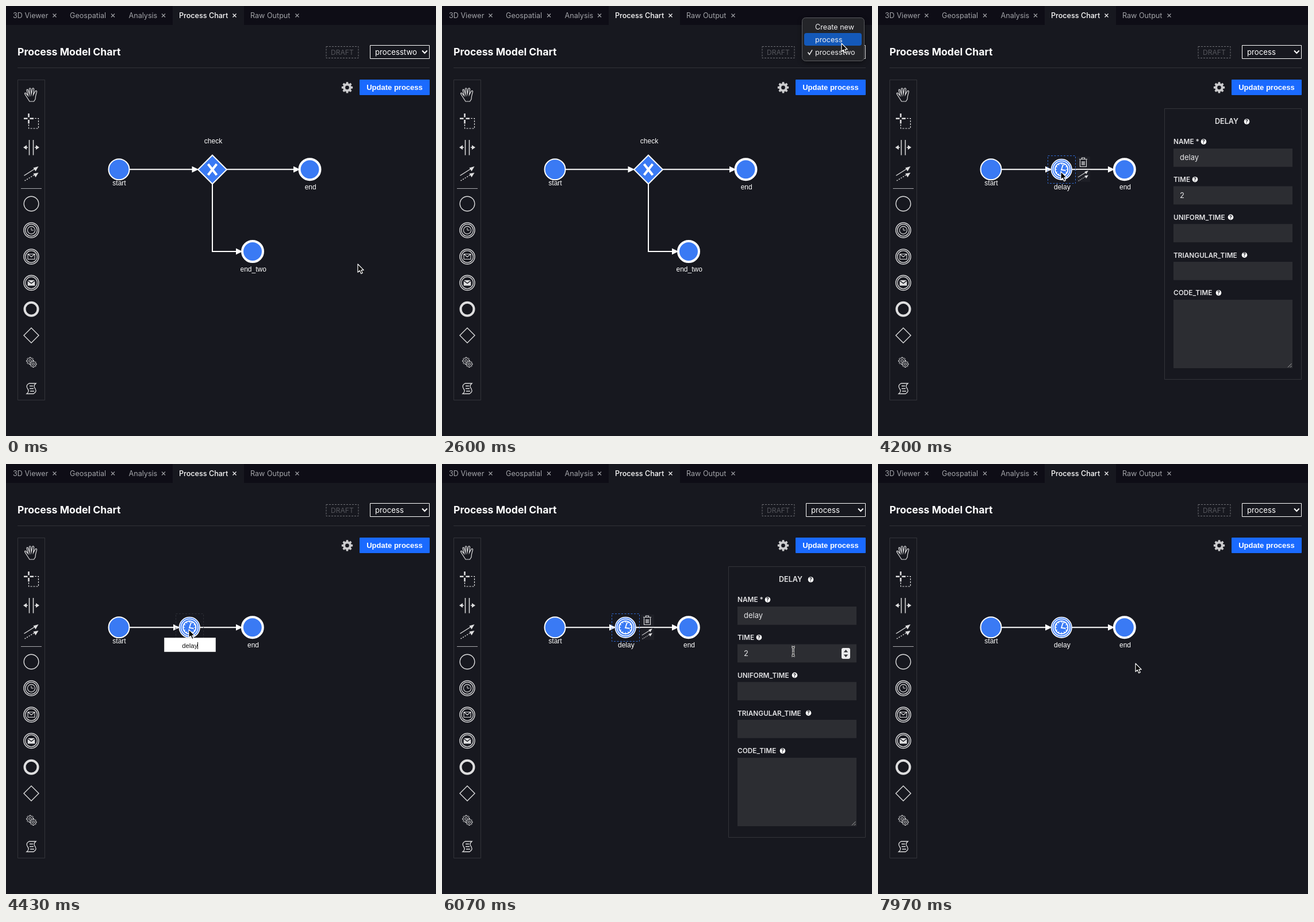
An HTML page with a canvas that plays this animation: 748x748 px, repeating every 8000 ms.

```html
<!DOCTYPE html>
<html lang="en">
<head>
<meta charset="utf-8">
<title>Process Model Chart</title>
<style>
html, body { margin: 0; width: 100%; height: 100%; overflow: hidden; background: #17181f; }
canvas { display: block; width: 748px; height: 748px; }
</style>
</head>
<body>
<canvas id="stage" width="748" height="748"></canvas>
<script>
const ctx = document.getElementById('stage').getContext('2d');
const LOOP = 8000;
const BG = '#17181f', BLUE = '#3a7af4', WHITE = '#fff', ICON = '#dededf', EDGE = '#33343a', FIELD = '#2c2d32';
const UI = 'Inter, sans-serif', ARIAL = '"Liberation Sans", Arial, sans-serif';

// Moments (ms) at which the interface changes
const AT = {
  menuOpen: 1450, menuHover: 1570, menuPick: 2660, menuFade: 2740, menuGone: 2900, switched: 2870,
  firstClick: 4130, editStart: 4300, editEnd: 4800, select: 5000, focus: 6170, deselect: 7830
};

// Pointer path: time, x, y
const PATH = [
  [0, 612, 449], [30, 612, 449], [830, 689, 100], [1100, 693, 80], [1270, 693, 79], [1500, 693, 79],
  [2230, 695, 65], [3230, 695, 65], [3430, 486, 243], [3720, 338, 283], [4060, 318, 288],
  [5540, 318, 288], [6040, 611, 326], [6870, 611, 326], [7200, 607, 322], [7420, 607, 322],
  [7800, 448, 347], [8000, 448, 347]
];

const between = (t, a, b) => t >= a && t < b;

function pointerAt(t) {
  const i = Math.max(1, PATH.findIndex(p => p[0] > t));
  const [t0, x0, y0] = PATH[i - 1], [t1, x1, y1] = PATH[i];
  let k = (t - t0) / (t1 - t0);
  k = k * k * (3 - 2 * k);
  return { x: x0 + (x1 - x0) * k, y: y0 + (y1 - y0) * k };
}

function text(str, x, y, size, color, { family = UI, weight = 400, align = 'left' } = {}) {
  ctx.font = `${weight} ${size}px ${family}`;
  ctx.textAlign = align;
  ctx.fillStyle = color;
  ctx.fillText(str, x, y);
}

function rect(x, y, w, h, fill, stroke, radius = 0) {
  ctx.beginPath();
  ctx.roundRect(x, y, w, h, radius);
  paint(fill, stroke, 1);
}

function circle(x, y, r, fill, stroke, width) {
  ctx.beginPath();
  ctx.arc(x, y, r, 0, Math.PI * 2);
  paint(fill, stroke, width);
}

function paint(fill, stroke, width) {
  if (fill) { ctx.fillStyle = fill; ctx.fill(); }
  if (stroke) { ctx.strokeStyle = stroke; ctx.lineWidth = width; ctx.stroke(); }
}

function shape(d, fill, stroke, width = 1.2) {
  const p = new Path2D(d);
  if (fill) { ctx.fillStyle = fill; ctx.fill(p); }
  if (stroke) { ctx.strokeStyle = stroke; ctx.lineWidth = width; ctx.stroke(p); }
}

function dashed(dash, draw) {
  ctx.setLineDash(dash);
  draw();
  ctx.setLineDash([]);
}

function gear(x, y, outer, inner, teeth, fill, stroke, width) {
  ctx.beginPath();
  const step = Math.PI * 2 / teeth;
  for (let i = 0; i < teeth; i++) {
    [[-.36, inner], [-.22, outer], [.22, outer], [.36, inner]].forEach(([off, r]) => {
      const a = (i + off) * step - Math.PI / 2;
      ctx.lineTo(x + Math.cos(a) * r, y + Math.sin(a) * r);
    });
  }
  ctx.closePath();
  paint(fill, stroke, width);
}

function drawHeader(process) {
  rect(0, 0, 748, 33, '#0e0d16');
  rect(290, 0, 124, 33, BG);
  const tabs = [['3D Viewer', 12, 84.5], ['Geospatial', 111, 186], ['Analysis', 213.5, 274],
    ['Process Chart', 301, 397.5], ['Raw Output', 425, 506.5]];
  tabs.forEach(([name, x, cx], i) => {
    const color = i === 3 ? WHITE : '#a3a4a9';
    text(name, x, 21, 12.6, color, { weight: i === 3 ? 500 : 400 });
    shape(`M${cx - 3} 13.5l6 6m0-6l-6 6`, null, color, 1.1);
  });
  text('Process Model Chart', 20, 85.5, 17.6, WHITE, { weight: 700 });
  rect(20, 107, 717, 1, '#313238');
  dashed([3, 2], () => rect(557, 70.5, 56, 20, null, '#707176'));
  text('DRAFT', 565, 85, 12.1, '#54555b');
  rect(633.5, 68.5, 103, 23, BG, WHITE);
  text(process, 642, 85, 13.2, WHITE);
  shape('M724 77.5l4.3 4.5l4.3-4.5', null, WHITE, 2);
  gear(593.5, 141.8, 9.8, 7.3, 8, '#cbcbcd');
  circle(593.5, 141.8, 3.4, BG);
  rect(615, 128, 122, 27, '#1a6aff', null, 1);
  text('Update process', 676, 146, 13, WHITE, { family: ARIAL, weight: 700, align: 'center' });
}

function connectIcon(x, y, s) {
  ctx.save();
  ctx.translate(x, y);
  ctx.scale(s, s);
  shape('M-12 4L7-8', null, ICON, 1.4);
  shape('M13-12L4-9.5L8-3.5Z M13-1L4 .5L8 7Z', ICON);
  dashed([2.2, 2], () => shape('M-11 13L7 2', null, ICON, 1.4));
  ctx.restore();
}

function drawPalette() {
  rect(20.5, 128.5, 47, 557, null, EDGE);
  shape('M36.5 159L32.5 152.5Q32.5 150.5 34.5 151.5L38.5 156L36 146.5Q36.5 144 38.3 146L41 154L40.5 144Q41.5 141.5 43.2 144L44 153.5L46 143.5Q48 142 48.6 144.5L47.5 154.5L51 148Q53.5 146.5 53.6 149L51.5 157L51 162L48.5 166H41Z', null, ICON);
  shape('M39.5 187v6.5M39.5 198v6.5M31 195.7h6.5M41.5 195.7h6.5', null, ICON, 2.6);
  dashed([3, 2], () => shape('M50 195.5h6.5v17.5h-17v-7', null, ICON, 1.2));
  shape('M40.5 233v26.5M47.5 233v26.5M32 246h6M50 246h6', null, ICON, 1.5);
  shape('M30 246l6-4v8zM58 246l-6-4v8z', ICON);
  connectIcon(43.5, 291, 1);
  rect(26, 317, 36, 1, '#a9a9ad');
  circle(44, 344, 12.8, null, ICON, 1.4);
  [390, 436, 481.5].forEach(y => {
    circle(44, y, 13, null, ICON, 1.4);
    circle(44, y, 10.3, null, ICON, 1.2);
  });
  circle(44, 390, 6.6, null, ICON, 1.1);
  shape('M44 386v4h4', null, ICON, 1);
  shape('M38 431.5h12v9h-12zl6 5l6-5', null, ICON, 1.1);
  shape('M38 477h12l-6 4.6zM37.7 478.5l6.3 4.8l6.3-4.8v8h-12.6z', ICON);
  circle(44, 527.3, 11.5, null, ICON, 4);
  shape('M44 560l13 13l-13 13l-13-13z', null, ICON, 1.4);
  gear(42, 617.5, 6.4, 4.6, 8, null, ICON, 1);
  circle(42, 617.5, 2.2, null, ICON, 1);
  gear(47.5, 623, 5.6, 4, 8, BG, ICON, 1);
  circle(47.5, 623, 1.9, null, ICON, 1);
  shape('M40 656.5H52C48 660 48 662 51 666C53 670 52 672 48 674.5H36C40 671 40 669 37.5 665.5C35 661 36 659 40 656.5ZM41 661H47M41 665.5H48M42 670H49', null, ICON, 1.3);
}

function label(str, x, y) {
  text(str, x, y, 12, WHITE, { family: ARIAL, align: 'center' });
}

function flow(d, tipX, tipY) {
  shape(d, null, WHITE, 2);
  shape(`M${tipX} ${tipY}l-11.5-5.5v11z`, WHITE);
}

function startEvent() {
  circle(196.5, 284.2, 18, BLUE, WHITE, 2);
  label('start', 197, 312);
}

function endEvent(name, x, y) {
  circle(x, y, 18, BLUE, WHITE, 4);
  label(name, x + 1.2, y + 35);
}

function drawBranchDiagram() {
  flow('M215 284.3H330', 335, 284.3);
  flow('M384 284.3H506', 511.5, 284.3);
  flow('M359 309V427H406', 411.5, 427);
  startEvent();
  shape('M359 259.5l25 25l-25 25l-25-25z', BLUE, WHITE, 2);
  shape('M351.5 275l15 19M366.5 275l-15 19', null, WHITE, 4.2);
  label('check', 360.5, 239);
  endEvent('end', 528.5, 284.2);
  endEvent('end_two', 429, 427);
}

function drawDelayDiagram() {
  flow('M215 284.3H297', 302.5, 284.3);
  flow('M337 284.3H406', 411.5, 284.3);
  startEvent();
  circle(319.2, 284.3, 17.8, BLUE, WHITE, 1.6);
  circle(319.2, 284.3, 14.8, null, WHITE, 1.5);
  circle(319.2, 284.3, 11.2, null, WHITE, 1.8);
  ctx.beginPath();
  for (let i = 0; i < 12; i++) {
    const a = i * Math.PI / 6;
    ctx.moveTo(319.2 + Math.cos(a) * 8.3, 284.3 + Math.sin(a) * 8.3);
    ctx.lineTo(319.2 + Math.cos(a) * 11, 284.3 + Math.sin(a) * 11);
  }
  paint(null, WHITE, 1.2);
  shape('M322 275.5L319 285L326.5 286', null, WHITE, 1.8);
  label('delay', 320.3, 319);
  endEvent('end', 428.8, 284.2);
}

function drawOutline(selected) {
  dashed([3, 2.5], () => rect(295.5, 260.5, 48, 48, null, selected ? '#3069cf' : '#2d2f37'));
}

function drawContextPad() {
  rect(346, 262, 23, 21, 'rgba(32,33,39,.9)');
  rect(346, 285, 23, 21, 'rgba(32,33,39,.9)');
  shape('M350 266.5h14M354.5 266v-2h5v2M351.5 267.5v12h11v-12M355 270v7M357 270v7M359 270v7', null, ICON, 1.2);
  connectIcon(356.5, 295, .72);
}

function drawEditor() {
  rect(275.5, 302.5, 89, 24, WHITE, '#ccc');
  text('delay', 319.8, 320, 11.3, '#111', { family: ARIAL, align: 'center' });
  rect(333, 310, 1, 12, '#000');
}

function heading(str, x, y, helpX, size = 11.8) {
  text(str, x, y, size, '#e4e4e6', { weight: 600 });
  circle(helpX, y - 4.3, 4.8, WHITE);
  text('?', helpX, y - 1.2, 8.5, BG, { weight: 700, align: 'center' });
}

function drawPanel(showSpinner, caret) {
  rect(498.5, 178.5, 238, 471, BG, EDGE);
  heading('DELAY', 586, 205.3, 641.5, 12.6);
  heading('NAME *', 514, 240.3, 566.5);
  heading('TIME', 514, 306, 551.5);
  heading('UNIFORM_TIME', 514, 371.7, 613.5);
  heading('TRIANGULAR_TIME', 514, 437.5, 637.5);
  heading('CODE_TIME', 514, 503.3, 592.5);
  [248, 313.6, 379.3, 445].forEach(y => rect(514, y, 207, 31.7, FIELD));
  rect(514, 511, 207, 119, FIELD);
  shape('M713 628.5l6.5-6.5M717 628.5l2.5-2.5', null, '#aaa', 1);
  text('delay', 525, 268, 13, '#e6e6e8');
  text('2', 525, 334, 13, '#e6e6e8');
  if (showSpinner) {
    rect(695, 320, 15, 19, '#ebebed', null, 3);
    shape('M702.5 323l3.8 4.5h-7.6zM702.5 336l3.8-4.5h-7.6z', '#333439');
  }
  if (caret) rect(532, 321, 1, 16, '#e6e6e8');
}

function drawMenu(t) {
  ctx.globalAlpha = t < AT.menuFade ? 1 : (AT.menuGone - t) / (AT.menuGone - AT.menuFade);
  ctx.save();
  ctx.shadowColor = 'rgba(0,0,0,.45)';
  ctx.shadowBlur = 8;
  ctx.shadowOffsetY = 3;
  rect(626.5, 20.5, 108, 75, '#242529', null, 6);
  ctx.restore();
  rect(626.5, 20.5, 108, 75, null, '#5b5c60', 6);
  const row = pointerAt(t).y < 69 ? 47 : 69;
  const blink = between(t, AT.menuPick, AT.menuPick + 50);
  if (!blink) rect(630, row, 100, 22, t < AT.menuHover ? '#3d3e42' : '#1459b9', null, 4);
  ['Create new', 'process', 'processtwo'].forEach((name, i) => text(name, 649, 41 + i * 22, 12.6, '#f0f0f1'));
  shape('M636.5 80.5l2.8 3.8l4.7-8', null, '#f0f0f1', 1.5);
  ctx.globalAlpha = 1;
}

function drawPointer({ x, y }, beam) {
  ctx.save();
  ctx.translate(x, y);
  ctx.lineJoin = 'round';
  if (beam) {
    const d = 'M-3-8Q0-8 0-6V6Q0 8-3 8M3-8Q0-8 0-6M0 6Q0 8 3 8M-2 2H2';
    shape(d, null, WHITE, 3.2);
    shape(d, null, '#111', 1.2);
  } else {
    shape('M0 0V14.2L3.3 11.2L5.6 16.6L8.2 15.5L5.9 10.3H10.2Z', '#000', WHITE, 1.2);
  }
  ctx.restore();
}

function render(t) {
  const pointer = pointerAt(t);
  const switched = t >= AT.switched;
  const editing = between(t, AT.editStart, AT.editEnd);
  const selected = between(t, AT.firstClick, AT.editStart) || between(t, AT.select, AT.deselect);
  const hover = between(pointer.x, 295, 344) && between(pointer.y, 260, 309);
  const overTime = between(pointer.x, 514, 721) && between(pointer.y, 313, 345);
  const focused = between(t, AT.focus, AT.deselect);

  rect(0, 0, 748, 748, BG);
  drawHeader(switched ? 'process' : 'processtwo');
  drawPalette();
  if (switched) {
    drawDelayDiagram();
    if (selected || hover) drawOutline(selected);
    if (selected) {
      drawContextPad();
      drawPanel(overTime || focused, focused && (t - AT.focus) % 1000 < 500);
    }
    if (editing) drawEditor();
  } else {
    drawBranchDiagram();
  }
  if (between(t, AT.menuOpen, AT.menuGone)) drawMenu(t);
  drawPointer(pointer, selected && overTime);
}

function tick(now) {
  render(now % LOOP);
  requestAnimationFrame(tick);
}
render(0);
requestAnimationFrame(tick);
</script>
</body>
</html>
```
